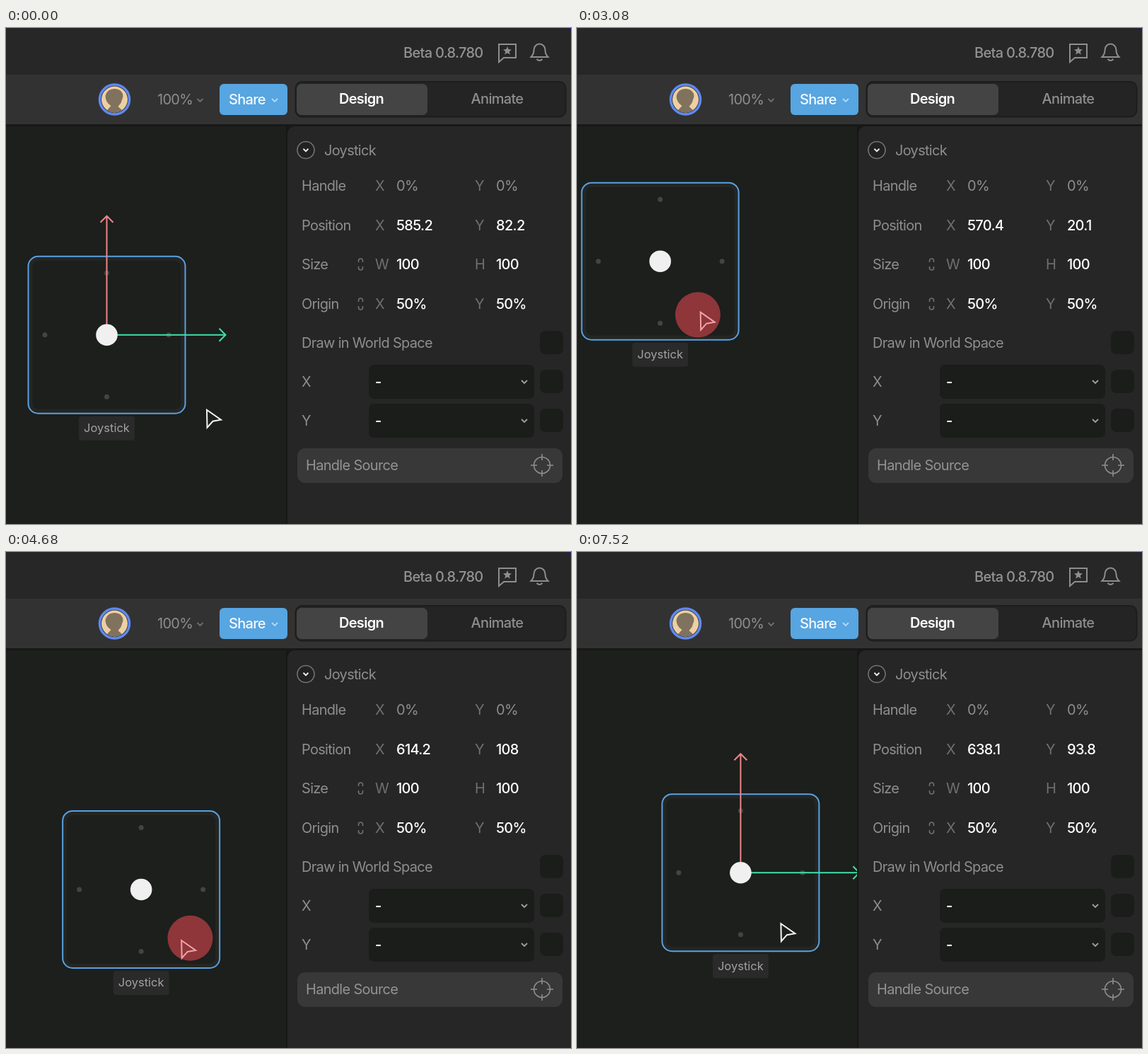
An HTML page with a canvas that plays this animation: 799x701 px, repeating every 7.54 s.

```html
<!DOCTYPE html>
<html lang="en">
<head>
<meta charset="utf-8">
<title>Joystick editor</title>
<style>
  html, body { margin: 0; width: 100%; height: 100%; overflow: hidden; background: #1c1e1c; }
  canvas { display: block; }
</style>
</head>
<body>
<canvas id="stage" width="799" height="701"></canvas>
<script>
const ctx = document.getElementById('stage').getContext('2d');
const LOOP = 7540, STEP = 20, PRESS = 1000, RELEASE = 6700;
const GRAY = '#8e8e8e', DIM = '#707070', FIELD = '#1b1d1b', CANVAS = '#1c1f1c';

// Drag path: time, position X, position Y
const path = [
  [1250, 585.2, 82.2], [1500, 583.5, 75], [1680, 571, 42], [1860, 599, 4], [2020, 641, 25],
  [2180, 655.2, 83.6], [2340, 617, 114], [2620, 574, 92], [2860, 566, 50], [3080, 570.4, 20.1],
  [3220, 594, 4], [3360, 640, 30], [3460, 656, 75], [3560, 644.2, 108.9], [3680, 610, 115],
  [3820, 574, 86], [3960, 567, 50], [4090, 578, 20], [4240, 607.1, 4.4], [4370, 640, 24],
  [4490, 652, 68], [4610, 635, 102], [4740, 596, 106], [4870, 571.5, 80], [4980, 583, 62],
  [5080, 616, 80], [5180, 637.8, 96.5], [5340, 642, 98], [5600, 639, 94.5], [5800, 638.1, 93.8]
];

const clamp = v => Math.max(0, Math.min(1, v));
const smooth = v => { v = clamp(v); return v * v * (3 - 2 * v); };

function slope(i, axis) {
  const a = path[i - 1], b = path[i + 1];
  return a && b ? (b[axis] - a[axis]) / (b[0] - a[0]) : 0;
}

function positionAt(t) {
  const last = path.length - 1;
  if (t <= path[0][0]) return path[0].slice(1);
  if (t >= path[last][0]) return path[last].slice(1);
  const i = path.findIndex(p => p[0] > t) - 1;
  const a = path[i], b = path[i + 1], span = b[0] - a[0], u = (t - a[0]) / span, v = 1 - u;
  return [1, 2].map(k =>
    a[k] * (1 + 2 * u) * v * v + slope(i, k) * span * u * v * v +
    b[k] * u * u * (3 - 2 * u) - slope(i + 1, k) * span * u * u * v);
}

const toScreen = ([x, y]) => [142.5 + (x - 585.2) * 1.68, 296 + y * 1.676];

function cursorAt(t) {
  const [x, y] = toScreen(positionAt(t));
  const away = 1 - smooth((t - 150) / 700);
  return [x + 56 + 84.5 * away, y + 70.5 + 34 * away];
}

function box(x, y, w, h, r, fill, stroke, width = 2) {
  ctx.beginPath();
  ctx.roundRect(x, y, w, h, r);
  if (fill) { ctx.fillStyle = fill; ctx.fill(); }
  if (stroke) { ctx.strokeStyle = stroke; ctx.lineWidth = width; ctx.stroke(); }
}

function disc(x, y, r, fill, stroke, width = 2) {
  ctx.beginPath();
  ctx.arc(x, y, r, 0, 7);
  if (fill) { ctx.fillStyle = fill; ctx.fill(); }
  if (stroke) { ctx.strokeStyle = stroke; ctx.lineWidth = width; ctx.stroke(); }
}

function draw(d, x, y, stroke, width = 2, fill) {
  ctx.save();
  ctx.translate(x, y);
  const shape = new Path2D(d);
  if (fill) { ctx.fillStyle = fill; ctx.fill(shape); }
  if (stroke) { ctx.strokeStyle = stroke; ctx.lineWidth = width; ctx.stroke(shape); }
  ctx.restore();
}

function text(str, x, y, color = GRAY, weight = 400, align = 'left', size = 20) {
  ctx.font = `${weight} ${size}px Inter, sans-serif`;
  ctx.letterSpacing = size === 20 ? '-0.7px' : '0px';
  ctx.textAlign = align;
  ctx.fillStyle = color;
  ctx.fillText(str, x, y + size * 0.36);
}

const chevron = (x, y, color, s = 4) =>
  draw(`M${-s} ${-s / 2}L0 ${s / 2}L${s} ${-s / 2}`, x, y, color, 1.8);

function joystick(t, x, y, snapped, active) {
  box(x - 111, y - 111, 222, 222, 14, '#242624', '#5aa0e0');
  box(x - 105, y - 105, 210, 210, 9, CANVAS);
  for (const [dx, dy] of [[0, -1], [1, 0], [0, 1], [-1, 0]])
    disc(x + dx * 87.5, y + dy * 87.5, 3.5, '#434543');
  box(x - 39.5, y + 115, 79, 34, 4, '#292a29');
  text('Joystick', x, y + 131.5, '#a2a2a2', 400, 'center', 16.5);

  if (!active) {
    draw('M0 0V-168M-9 -159L0 -168L9 -159', x, y, '#f0858c');
    draw('M0 0H168M159 -9L168 0L159 9', x, y, '#3fe0ab');
  }
  disc(x, y, 15.3, '#f0f0f0');
  if (snapped) {
    const cross = 'M-5 -5L5 5M-5 5L5 -5';
    draw(`M0 0H${-x}`, x, y, '#f0567a');
    draw(cross, x, y, '#f0567a');
    draw(cross, 1, y, '#f0567a');
  }
}

function pointer(t, active) {
  const [x, y] = cursorAt(t);
  const shape = 'M1 1.5L21 15.5L9.5 17.5L1.5 26.5Z';
  const press = smooth((t - PRESS + 60) / 120) * (1 - smooth((t - RELEASE) / 160));
  if (!active) draw(shape, x, y, '#f4f4f4', 2, '#1d1f1d');
  if (press > 0) {
    const [cx, cy] = cursorAt(t - 24);
    disc(cx, cy, 32 * (0.6 + 0.4 * press), `rgba(219,71,79,${0.6 * press})`);
  }
  if (active) draw(shape, x, y, '#f0a4a8');
}

function header() {
  ctx.fillStyle = '#272727';
  ctx.fillRect(0, 0, 799, 66);
  ctx.fillStyle = '#323232';
  ctx.fillRect(0, 66, 799, 70);
  ctx.fillStyle = '#171817';
  ctx.fillRect(0, 136, 799, 3);
  draw('M0 0H8V8Q7 1 0 0Z', 791, 0, null, 0, '#251c58');

  text('Beta 0.8.780', 562, 35, '#939393', 500);
  draw('M-12 -11H12V8H-5L-12 14Z', 709, 34, GRAY);
  draw('M0 -7L1.6 -3L6 -2.6L2.7 0.2L3.8 4.5L0 2.2L-3.8 4.5L-2.7 0.2L-6 -2.6L-1.6 -3Z', 709, 33, null, 0, GRAY);
  draw('M-12 7Q-8 3 -8 -3A8 8.5 0 0 1 8 -3Q8 3 12 7ZM-4 10Q0 14 4 10', 754.5, 34, GRAY);

  disc(153.5, 101, 21, '#2b2b2b', '#6089f0', 3.5);
  disc(153.5, 101, 18.5, '#ecd0a3');
  ctx.save();
  ctx.beginPath();
  ctx.arc(153.5, 101, 18.5, 0, 7);
  ctx.clip();
  draw('M-13 -5Q-10 -16 1 -15Q12 -14 12 -4L9 5L5 10L16 20H-15L-5 9Q-13 4 -13 -5Z', 153.5, 101, null, 0, '#81725e');
  ctx.restore();

  text('100%', 214, 101, GRAY);
  chevron(274.5, 102, DIM);
  box(302, 79, 96, 44, 6, '#57a5e1');
  text('Share', 315, 101, '#f5f9ff', 500);
  chevron(380, 102, '#b5d8f5');
  box(409.5, 76, 382, 49.5, 9, '#242424', '#1d1d1d');
  box(411, 79, 185, 44, 7, '#444444');
  text('Design', 502.5, 100, '#ffffff', 600, 'center');
  text('Animate', 694.5, 100, GRAY, 500, 'center');
}

function row(y, name, a, first, b, second, color = '#ffffff', weight = 500) {
  text(name, 418, y);
  text(a, 522, y, DIM);
  text(first, 552, y, color, weight);
  text(b, 663, y, DIM);
  text(second, 693, y, color, weight);
}

const link = y => draw('M-3 -3V-5Q-3 -8 0 -8Q3 -8 3 -5V-3M-3 3V5Q-3 8 0 8Q3 8 3 5V3', 501.5, y, DIM, 1.6);

function panel(pos) {
  ctx.fillStyle = '#161716';
  ctx.fillRect(396, 139, 403, 562);
  box(398, 139, 401, 562, [10, 0, 0, 0], '#262626');

  disc(424, 172.5, 12, '#222222', '#737373', 1.6);
  chevron(424, 172.5, '#f0f0f0', 3.5);
  text('Joystick', 450, 173);

  const [px, py] = pos.map(v => String(Math.round(v * 10) / 10));
  row(223, 'Handle', 'X', '0%', 'Y', '0%', GRAY, 400);
  row(279, 'Position', 'X', px, 'Y', py);
  row(334, 'Size', 'W', '100', 'H', '100');
  row(390, 'Origin', 'X', '50%', 'Y', '50%');
  link(334);
  link(390);

  text('Draw in World Space', 418, 445);
  for (const y of [444.5, 499.5, 554.5]) box(755, y - 16.5, 33, 33, 8, FIELD);
  for (const [name, y] of [['X', 500], ['Y', 555]]) {
    text(name, 418, y);
    box(513, y - 24, 234, 48, 7, FIELD);
    text('-', 522, y, '#ffffff', 600);
    chevron(733, y, '#a0a0a0');
  }

  box(412, 594, 375, 49, 11, '#383838');
  text('Handle Source', 424, 618, '#939393');
  disc(758, 618, 11.5, null, GRAY, 1.6);
  draw('M0 -16V-7M0 16V7M-16 0H-7M16 0H7', 758, 618, GRAY, 1.6);
}

function render(t) {
  const pos = positionAt(t);
  const active = t >= PRESS && t < RELEASE;
  const snapped = active && Math.abs(pos[1]) < 6.5;
  if (snapped) pos[1] = 0;

  ctx.fillStyle = CANVAS;
  ctx.fillRect(0, 0, 799, 701);
  joystick(t, ...toScreen(pos), snapped, active);
  pointer(t, active);
  panel(pos);
  header();
}

let start;
function tick(now) {
  start ??= now;
  render(Math.floor((now - start) % LOOP / STEP) * STEP);
  requestAnimationFrame(tick);
}
requestAnimationFrame(tick);
</script>
</body>
</html>
```
